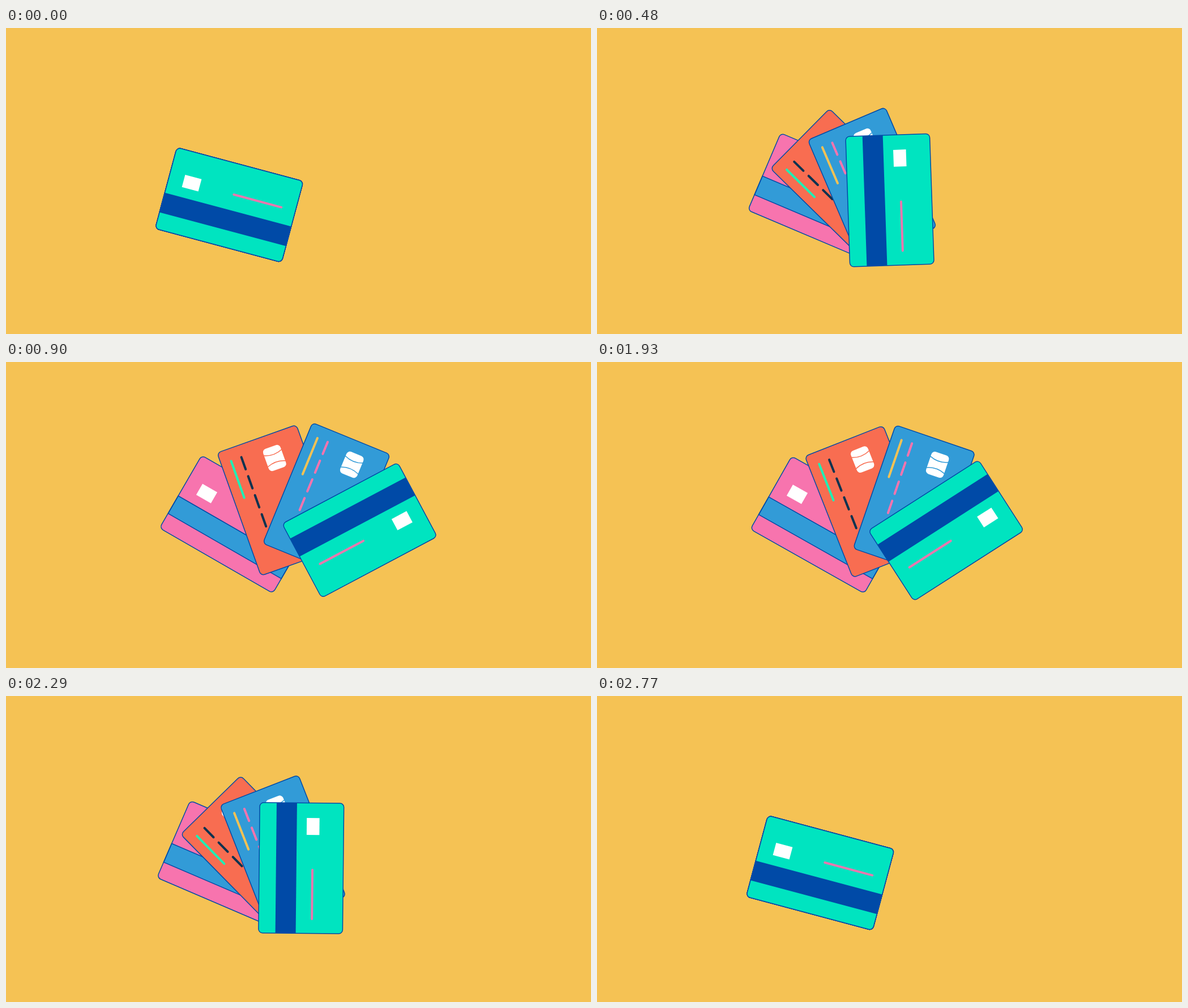
An HTML page with a canvas for the animation above (3.47 s loop, 1033x542 px).

```html
<!DOCTYPE html>
<html lang="en">
<head>
<meta charset="utf-8">
<title>Card fan</title>
<style>
  html, body { margin: 0; width: 100%; height: 100%; overflow: hidden; background: #f5c254; }
  canvas { display: block; }
</style>
</head>
<body>
<canvas id="stage" width="1033" height="542"></canvas>
<script>
const ctx = document.getElementById('stage').getContext('2d');

const COLORS = {
  ground: '#f5c254', outline: '#004aa7', pink: '#f774ae', orange: '#f86d51',
  blue: '#329bd7', green: '#00e4c0', mint: '#1fefb5', navy: '#0a3350', white: '#fff'
};
const CARD = { width: 231, height: 148.5, radius: 7 };
const CLOSED = { x: 394.2, y: 313.4, angle: 15 };

// Listed from back to front; x, y and angle give the opened pose.
const cards = [
  { x: 408.4, y: 287.5, angle: 30, color: COLORS.pink, face: pinkFace },
  { x: 481.4, y: 244.9, angle: 70.4, color: COLORS.orange,
    face: () => stripedFace(COLORS.orange, COLORS.mint, COLORS.navy) },
  { x: 566, y: 242.5, angle: 112.3, color: COLORS.blue,
    face: () => stripedFace(COLORS.blue, COLORS.ground, COLORS.pink) },
  { x: 624.5, y: 297.9, angle: 152, color: COLORS.green, face: greenFace }
];

function line(x1, x2, y, color) {
  ctx.beginPath();
  ctx.moveTo(x1, y);
  ctx.lineTo(x2, y);
  ctx.lineWidth = 4;
  ctx.strokeStyle = color;
  ctx.stroke();
}

function squareChip() {
  ctx.fillStyle = COLORS.white;
  ctx.fillRect(-89, -31.5, 30, 22.5);
}

function band(color) {
  ctx.fillStyle = color;
  ctx.fillRect(-CARD.width / 2, 8.5, CARD.width, 36);
}

function pinkFace() {
  squareChip();
  band(COLORS.blue);
  ctx.lineWidth = 1.5;
  ctx.strokeStyle = COLORS.outline;
  ctx.strokeRect(-CARD.width / 2, 8.5, CARD.width, 36);
}

function greenFace() {
  squareChip();
  band(COLORS.outline);
  line(3, 90, -19.8, '#e878ae');
}

function stripedFace(base, lineColor, dashColor) {
  ctx.beginPath();
  ctx.roundRect(-93.7, -34.6, 41.5, 32.4, 6.5);
  ctx.fillStyle = COLORS.white;
  ctx.fill();

  ctx.beginPath();
  for (const [end, bend] of [[-83, -76], [-62, -69]]) {
    ctx.moveTo(end, -35);
    ctx.quadraticCurveTo(bend, -18.4, end, -2);
  }
  ctx.lineWidth = 1.5;
  ctx.strokeStyle = base;
  ctx.stroke();

  line(-93.5, -24.5, 55.7, lineColor);
  for (let i = 0; i < 4; i++) {
    const start = -94 + i * 35.8;
    line(start, start + 22.8, 36.4, dashColor);
  }
}

function drawCard(card, openness) {
  const mix = key => CLOSED[key] + (card[key] - CLOSED[key]) * openness;
  ctx.save();
  ctx.translate(mix('x'), mix('y'));
  ctx.rotate(mix('angle') * Math.PI / 180);

  const shape = new Path2D();
  shape.roundRect(-CARD.width / 2, -CARD.height / 2, CARD.width, CARD.height, CARD.radius);
  ctx.fillStyle = card.color;
  ctx.fill(shape);
  card.face();
  ctx.lineWidth = 1.5;
  ctx.strokeStyle = COLORS.outline;
  ctx.stroke(shape);
  ctx.restore();
}

// Open, hold, close and rest, advancing in 30 ms steps.
function opennessAt(time) {
  const steps = from => Math.floor((time - from) / 30);
  return time < 1900 ? Math.min(1, steps(0) / 30) : Math.max(0, 1 - steps(1900) / 29);
}

const startTime = performance.now();

function render() {
  const openness = opennessAt((performance.now() - startTime) % 3470);
  ctx.fillStyle = COLORS.ground;
  ctx.fillRect(0, 0, 1033, 542);
  ctx.lineCap = 'round';
  for (const card of cards) drawCard(card, openness);
  requestAnimationFrame(render);
}
render();
</script>
</body>
</html>
```
